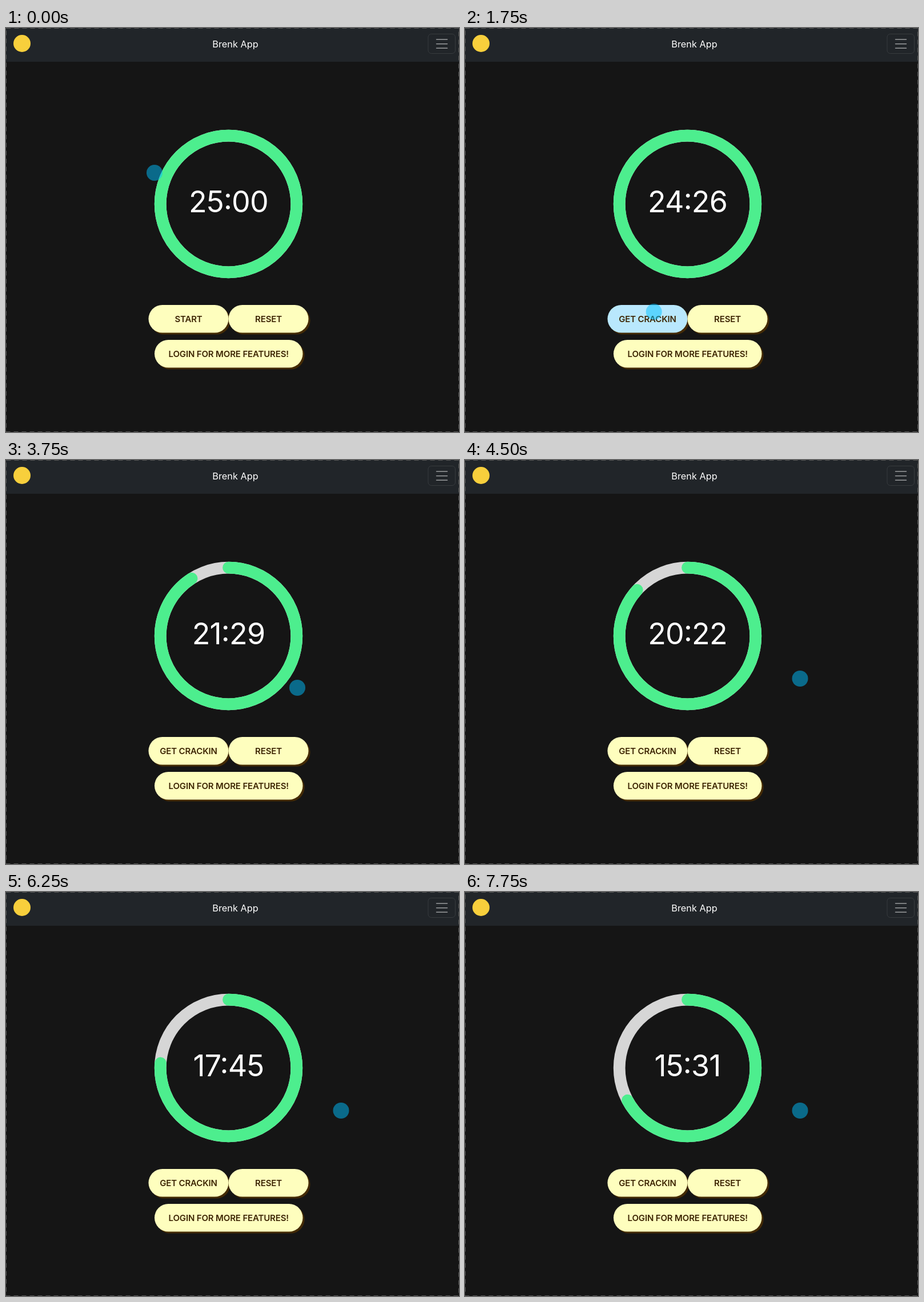
An HTML page for the animation above (8000 ms loop, 793 px wide and 706 px high).

```html
<!DOCTYPE html>
<html lang="en">
<head>
<meta charset="utf-8">
<title>Brenk App</title>
<style>
  html, body { margin: 0; width: 100%; height: 100%; overflow: hidden; background: #151515; }
  svg { display: block; }
  text { font-family: Inter, "Open Sans", sans-serif; text-anchor: middle; fill: #fff; }
  .label { font-size: 15px; font-weight: 600; letter-spacing: -0.01em; fill: #3d2503; }
  .shadow { fill: #432a04; }
  .face { fill: #fefebe; }
  #clock { font-size: 51.9px; letter-spacing: -0.015em; font-feature-settings: "calt" 1; }
</style>
</head>
<body>
<svg width="793" height="706" viewBox="0 0 793 706">
  <rect width="793" height="706" fill="#151515"/>
  <rect width="793" height="59" fill="#212529"/>
  <circle cx="28" cy="27" r="15" fill="#f8cf3c"/>
  <text x="401.5" y="34" font-size="16.3">Brenk App</text>
  <rect x="739" y="10.5" width="47.5" height="34" rx="5.5" fill="none" stroke="#373b3e"/>
  <path d="M753.5 20H772.5M753.5 27.7H772.5M753.5 35.3H772.5" stroke="#9b9d9f" stroke-width="1.5" stroke-linecap="round"/>
  <rect x=".5" y=".5" width="792" height="705" fill="none" stroke="#555" stroke-dasharray="8 6"/>

  <g fill="none" stroke-width="20.76" transform="rotate(-90 389.5 307.5)">
    <circle cx="389.5" cy="307.5" r="119.3" stroke="#d6d6d6"/>
    <circle id="arc" cx="389.5" cy="307.5" r="119.3" stroke="#4dee8e" stroke-linecap="round" pathLength="360"/>
  </g>
  <text id="clock" x="389.5" y="322">25:00</text>

  <g id="buttons"></g>

  <circle id="pulse" r="17" fill="#00bfff" fill-opacity=".05" stroke="#00a5dc" stroke-opacity=".22" stroke-width="2.5"/>
  <circle id="cursor" r="14" fill="#00bfff" fill-opacity=".5"/>
</svg>
<script>
const LOOP = 8000, STEP = 250, START_AT = 1375;
const $ = id => document.getElementById(id);

// Keys are [time, value, ...]
const secondsKeys = [[START_AT, 1500], [2500, 1399], [3750, 1289], [4500, 1222], [6250, 1065], [7750, 931]];
const gapKeys = [[1500, 0], [2000, 1.5], [2500, 9], [3750, 32.7], [4500, 47.7], [6250, 85.9], [7750, 118.4]];
const cursorKeys = [[0, 260, 253], [1000, 309, 518], [1500, 309, 518], [2500, 448, 376], [3750, 510, 398], [4500, 586.5, 382]];

const smooth = p => p * p * (3 - 2 * p);
const linear = p => p;

function sample(keys, t, ease = linear) {
  if (t <= keys[0][0]) return keys[0].slice(1);
  for (let i = 1; i < keys.length; i++) {
    const a = keys[i - 1], b = keys[i];
    if (t <= b[0]) {
      const p = ease((t - a[0]) / (b[0] - a[0]));
      return a.slice(1).map((v, k) => v + (b[k + 1] - v) * p);
    }
  }
  return keys[keys.length - 1].slice(1);
}

function addButton(x, y, w, label) {
  const h = 48.5;
  const box = (cls, d) =>
    `<rect class="${cls}" x="${x + d}" y="${y + d}" width="${w}" height="${h}" rx="${h / 2}"/>`;
  $("buttons").insertAdjacentHTML("beforeend",
    `<g>${box("shadow", 3)}${box("face", 0)}<text class="label" x="${x + w / 2}" y="${y + 29.6}">${label}</text></g>`);
  return $("buttons").lastElementChild;
}

const startButton = addButton(249.5, 484, 140, "START");
addButton(389.5, 484, 140, "RESET");
addButton(260, 545, 259.5, "LOGIN FOR MORE FEATURES!");
const startFace = startButton.querySelector(".face");
const startLabel = startButton.querySelector("text");

function clockText(sec) {
  const two = n => String(n).padStart(2, "0");
  return two(Math.floor(sec / 60)) + ":" + two(sec % 60);
}

function place(el, x, y, shown) {
  el.setAttribute("cx", x);
  el.setAttribute("cy", y);
  el.setAttribute("visibility", shown ? "visible" : "hidden");
}

function draw(time) {
  const t = Math.floor((time % LOOP) / STEP) * STEP;
  const [sec] = sample(secondsKeys, t);
  const [gap] = sample(gapKeys, t);
  const [x, y] = sample(cursorKeys, t, smooth);
  const clicking = t === 1250;
  const hover = x > 249.5 && x < 389.5 && y > 484 && y < 532.5;

  $("clock").textContent = clockText(Math.round(sec));
  $("arc").setAttribute("stroke-dasharray", gap > 0 ? `${360 - gap} 720` : "none");
  startLabel.textContent = t < START_AT ? "START" : "GET CRACKIN";
  startFace.style.fill = hover ? "#b9e8fd" : "#fefebe";
  place($("cursor"), x, y, !clicking);
  place($("pulse"), x, y, clicking);
}

const began = performance.now();
function tick() {
  draw(performance.now() - began);
  requestAnimationFrame(tick);
}
tick();
</script>
</body>
</html>
```
